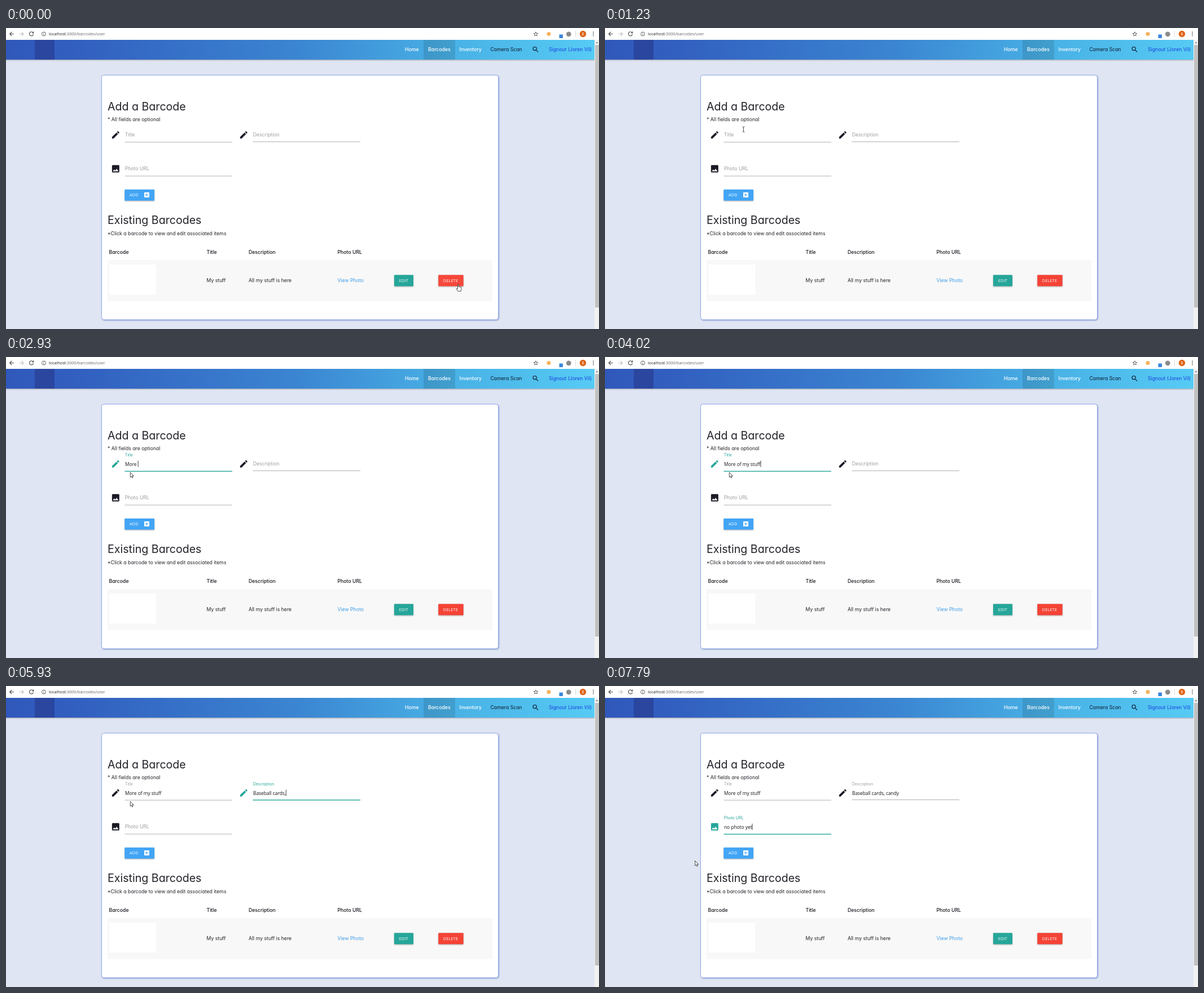
Write an HTML page that moves like this. It is 1051x533 px and loops after 8000 ms.

```html
<!DOCTYPE html>
<html lang="en">
<head>
<meta charset="utf-8">
<title>Add a Barcode</title>
<style>
html, body { margin: 0; width: 100%; height: 100%; overflow: hidden; background: #dfe5f2; }
svg { display: block; width: 1051px; height: 533px; }
text { white-space: pre; font: 8.7px Inter, sans-serif; font-feature-settings: "cv11"; fill: #22222a; }
.h { font-size: 19.6px; }
.th { font-weight: 500; fill: #15151c; }
.nav { fill: #fff; font-size: 8.75px; font-weight: 500; }
.sys { font-family: "Open Sans", "Noto Sans", sans-serif; }
.btn { font-size: 7.2px; font-weight: 500; letter-spacing: .25px; fill: #fff; }
.url { font-size: 7.2px; fill: #5f6368; }
.value { font-size: 8.35px; fill: #111; }
.raised { filter: drop-shadow(0 1px 1px rgba(0, 0, 0, .3)); }
</style>
</head>
<body>
<svg id="stage" viewBox="0 0 1051 533" xmlns="http://www.w3.org/2000/svg">
  <defs>
    <linearGradient id="bar">
      <stop offset="0" stop-color="#3058bb"/>
      <stop offset=".13" stop-color="#3260c0"/>
      <stop offset=".5" stop-color="#3b86d2"/>
      <stop offset=".75" stop-color="#48b0e5"/>
      <stop offset="1" stop-color="#56cbf4"/>
    </linearGradient>
    <path id="pen" d="M3 17.25V21h3.75L17.81 9.94l-3.75-3.75L3 17.25zM20.71 7.04a1 1 0 0 0 0-1.41l-2.34-2.34a1 1 0 0 0-1.41 0l-1.83 1.83 3.75 3.75 1.83-1.83z"/>
    <path id="image" d="M21 19V5c0-1.1-.9-2-2-2H5c-1.1 0-2 .9-2 2v14c0 1.1.9 2 2 2h14c1.1 0 2-.9 2-2zM8.5 13.5l2.5 3.01L14.5 12l4.5 6H5l3.5-4.5z"/>
    <path id="plus" d="M19 3H5c-1.11 0-2 .9-2 2v14c0 1.1.89 2 2 2h14c1.1 0 2-.9 2-2V5c0-1.1-.9-2-2-2zm-2 10h-4v4h-2v-4H7v-2h4V7h2v4h4v2z"/>
    <path id="lens" d="M15.5 14h-.79l-.28-.27A6.47 6.47 0 0 0 16 9.5 6.5 6.5 0 1 0 9.5 16c1.61 0 3.09-.59 4.23-1.57l.27.28v.79l5 4.99L20.49 19l-4.99-5zm-6 0C7.01 14 5 11.99 5 9.5S7.01 5 9.5 5 14 7.01 14 9.5 11.99 14 9.5 14z"/>
  </defs>
  <rect width="1051" height="533" fill="#dfe5f2"/>

  <!-- navigation -->
  <rect class="raised" y="21" width="1043" height="35" fill="url(#bar)"/>
  <rect x="51" y="21" width="35" height="35" fill="#2a469f"/>
  <rect x="740" y="21" width="56" height="35" fill="#000" opacity=".11"/>
  <text class="nav" x="707" y="41">Home</text>
  <text class="nav" x="748" y="41">Barcodes</text>
  <text class="nav" x="803.5" y="41">Inventory</text>
  <text x="858.5" y="41" style="fill:#10182c">Camera Scan</text>
  <use href="#lens" transform="translate(931.8 31.2) scale(.57)" fill="#10182c"/>
  <text x="962" y="41" style="fill:#1c3fe0">Signout (Joren Vil)</text>

  <!-- browser bar -->
  <rect width="1051" height="21" fill="#fff"/>
  <g fill="none" stroke="#505357" stroke-width="1.2">
    <path d="M14 10.5H6.8M10.2 7L6.7 10.5 10.2 14"/>
    <path d="M23.5 10.5H31M27.7 7l3.4 3.5-3.4 3.5" stroke="#c2c4c6"/>
    <path d="M48 8.2A3.6 3.6 0 1 0 48.6 11.2M48.7 6.2V9H45.9"/>
    <circle cx="67" cy="10.5" r="3.5" stroke-width=".9"/>
    <path d="M67 10V12.5M67 8.2V9" stroke-width=".9"/>
    <path d="M939 6.8L940 9.4 942.7 9.6 940.6 11.3 941.3 14 939 12.5 936.7 14 937.4 11.3 935.3 9.6 938 9.4Z" stroke-width=".9"/>
    <path d="M1009.5 5V16" stroke="#dadce0" stroke-width="1"/>
  </g>
  <g fill="#505357">
    <circle cx="1041" cy="7.4" r=".9"/><circle cx="1041" cy="10.5" r=".9"/><circle cx="1041" cy="13.6" r=".9"/>
  </g>
  <text class="sys url" x="76" y="13"><tspan fill="#202124">localhost</tspan>:3000/barcodes/user</text>
  <circle cx="962" cy="10.5" r="3.6" fill="#f3b45f"/>
  <rect x="980.5" y="11.5" width="6.5" height="6.5" fill="#3b86de"/>
  <circle cx="997.3" cy="10.8" r="4.4" fill="#8b8b8b"/>
  <circle cx="1022.5" cy="10.5" r="5.7" fill="#dd6416"/>
  <text class="sys" x="1022.5" y="12.8" text-anchor="middle" style="font-size:6.2px;fill:#fff">B</text>

  <!-- scroll bar -->
  <rect x="1043" y="21" width="8" height="512" fill="#f1f1f1"/>
  <rect x="1044" y="30" width="7" height="465" fill="#c1c1c1"/>
  <path d="M1045 27L1047.3 24.3 1049.6 27Z" fill="#8a8a8a"/>

  <!-- card -->
  <rect x="169.5" y="83.5" width="703" height="433" rx="4" fill="#fff" stroke="#92aae6" style="filter:drop-shadow(1px 1px 1px rgba(70,100,190,.55))"/>
  <text class="h" x="180" y="146">Add a Barcode</text>
  <text x="180" y="165.3">* All fields are optional</text>
  <g id="fields"></g>

  <rect class="raised" x="210.3" y="286" width="52.7" height="19.7" rx="1" fill="#42a5f5"/>
  <text class="sys btn" x="219" y="298.2">ADD</text>
  <use href="#plus" transform="translate(243.5 289.6) scale(.5)" fill="#fff"/>

  <text class="h" x="180" y="347">Existing Barcodes</text>
  <text x="180" y="367.3">*Click a barcode to view and edit associated items</text>
  <text class="th" x="182.5" y="399.5">Barcode</text>
  <text class="th" x="355.5" y="399.5">Title</text>
  <text class="th" x="430" y="399.5">Description</text>
  <text class="th" x="587.5" y="399.5">Photo URL</text>
  <rect x="180" y="411" width="682" height="72.5" fill="#f8f8f8"/>
  <rect x="183" y="419" width="83" height="53" fill="#fff"/>
  <text x="355.5" y="450.2">My stuff</text>
  <text x="430" y="450.2">All my stuff is here</text>
  <text x="587.5" y="450.2" style="fill:#3f9ee8">View Photo</text>
  <rect class="raised" x="688" y="437.3" width="34" height="20" rx="1" fill="#26a69a"/>
  <text class="sys btn" x="696.8" y="450">EDIT</text>
  <rect class="raised" id="delete" x="766.3" y="437.3" width="44.4" height="20" rx="1"/>
  <text class="sys btn" x="774.8" y="450">DELETE</text>

  <!-- pointer shapes, each with its hot spot at 0,0 -->
  <g id="cursor" stroke-linejoin="round">
    <path id="arrow" d="M0 0V8.6L2 6.9 3.3 9.9 4.7 9.2 3.4 6.3H6.1Z" fill="#fff" stroke="#222" stroke-width=".8"/>
    <path id="beam" d="M-2-4.5H-.7L0-4 .7-4.5H2M0-4V4M-2 4.5H-.7L0 4 .7 4.5H2" fill="none" stroke="#333" stroke-width=".9"/>
    <path id="hand" d="M-.8.7Q0-.4.8.7V4.2L5.4 5.4Q6 5.6 5.9 7L4.8 12.3H-.4L-3 8.2Q-3 6.6-.8 8Z" fill="#fff" stroke="#222" stroke-width=".8"/>
  </g>
</svg>
<script>
const LOOP = 8000, TEAL = "#26a69a", GRAY = "#9e9e9e", INK = "#1b1b26";
const $ = id => document.getElementById(id);

function add(parent, tag, attrs) {
  const el = document.createElementNS("http://www.w3.org/2000/svg", tag);
  for (const name in attrs) el.setAttribute(name, attrs[name]);
  return parent.appendChild(el);
}

// The picture only changes at these times.
const ticks = [0, 150, 310, 460, 620, 770, 1080, 1230, 1390, 1540, 1690, 1840,
  2170, 2470, 2630, 2930, 3080, 3560, 3710, 3860, 4020,
  4340, 4500, 4690, 4850, 5010, 5160, 5320, 5470, 5620, 5780, 5930, 6090, 6240, 6400,
  6550, 6700, 7160, 7310, 7470, 7640, 7790];

const pointer = [
  [0, "hand", 801.3, 453.8],
  [150, "arrow", 735, 415],
  [310, "arrow", 540, 296],
  [460, "arrow", 350, 205],
  [620, "beam", 268, 163],
  [770, "beam", 244, 149],
  [1080, "beam", 245, 162],
  [1230, "beam", 245.5, 179.5],
  [1390, "beam", 240, 189],
  [1540, "beam", 233, 191],
  [1690, "beam", 225, 198],
  [1840, "arrow", 220.3, 204.3],
  [7310, "arrow", 294, 126],
  [7470, "arrow", 246, 190],
  [7640, "arrow", 186, 272],
  [7790, "arrow", 159.6, 309.5]
];

// focus and blur times, then typed text as [time, text]
const fields = [
  { label: "Title", icon: "pen", x: 211, y: 202, focus: 1330, blur: 4260, caretFrom: 2170, typed: [
    [2170, "M"], [2470, "Mor"], [2630, "More"], [2930, "More "], [3080, "More m"],
    [3560, "More o"], [3710, "More of m"], [3860, "More of my s"], [4020, "More of my stuff"]] },
  { label: "Description", icon: "pen", x: 438, y: 201.5, focus: 4260, blur: 6410, caretFrom: 4340, typed: [
    [4690, "B"], [4850, "Bas"], [5010, "Basebal"], [5160, "Baseball "], [5320, "Baseball c"],
    [5470, "Baseball ca"], [5620, "Baseball card"], [5780, "Baseball cards"], [5930, "Baseball cards,"],
    [6090, "Baseball cards, "], [6240, "Baseball cards, can"], [6400, "Baseball cards, candy"]] },
  { label: "Photo URL", icon: "image", x: 211, y: 262, focus: 6410, blur: LOOP, caretFrom: 6550, typed: [
    [7160, "n"], [7310, "no p"], [7470, "no phot"], [7640, "no photo y"], [7790, "no photo yet"]] }
];

for (const f of fields) {
  const g = $("fields");
  f.base = f.y > 250 ? 252.7 : 192.7;
  f.iconEl = add(g, "use", { href: "#" + f.icon, transform: `translate(${f.x - 25.3} ${f.base - 12}) scale(.72)` });
  f.lineEl = add(g, "rect", { x: f.x - .5, width: 190.5 });
  f.labelEl = add(g, "text", { x: f.x - .3 });
  f.labelEl.textContent = f.label;
  f.valueEl = add(g, "text", { class: "sys value", x: f.x, y: f.base + .2 });
  f.caretEl = add(g, "rect", { y: f.base - 9, width: .8, height: 11, fill: "#111" });
}

const latest = (rows, t) => rows.filter(row => row[0] <= t).pop();

function drawField(f, t) {
  const on = t >= f.focus && t < f.blur;
  const k = Math.min(1, Math.max(0, (t - f.focus) / 130));
  const rise = 1 - (1 - k) ** 2;
  const text = (latest(f.typed, t) || [0, ""])[1];
  f.iconEl.setAttribute("fill", on ? TEAL : INK);
  f.lineEl.setAttribute("fill", on ? TEAL : GRAY);
  f.lineEl.setAttribute("y", f.y - .3);
  f.lineEl.setAttribute("height", on ? 1.4 : .8);
  f.labelEl.setAttribute("y", f.base - 16.2 * rise - .4);
  f.labelEl.style.fontSize = 8.7 - 1.74 * rise + "px";
  f.labelEl.style.fill = on ? TEAL : GRAY;
  if (f.valueEl.textContent !== text) f.valueEl.textContent = text;
  f.caretEl.setAttribute("x", f.x + (text ? f.valueEl.getComputedTextLength() : 0));
  f.caretEl.setAttribute("visibility", on && t >= f.caretFrom ? "visible" : "hidden");
}

function draw(time) {
  const t = ticks.filter(tick => tick <= time).pop();
  fields.forEach(f => drawField(f, t));
  const [, shape, x, y] = latest(pointer, t);
  $("cursor").setAttribute("transform", `translate(${x} ${y})`);
  for (const id of ["arrow", "beam", "hand"]) $(id).style.display = id === shape ? "" : "none";
  $("delete").setAttribute("fill", t < 1080 ? "#f6483b" : "#f44336");
}

const start = performance.now();
function frame() {
  draw((performance.now() - start) % LOOP);
  requestAnimationFrame(frame);
}
frame();
</script>
</body>
</html>
```
